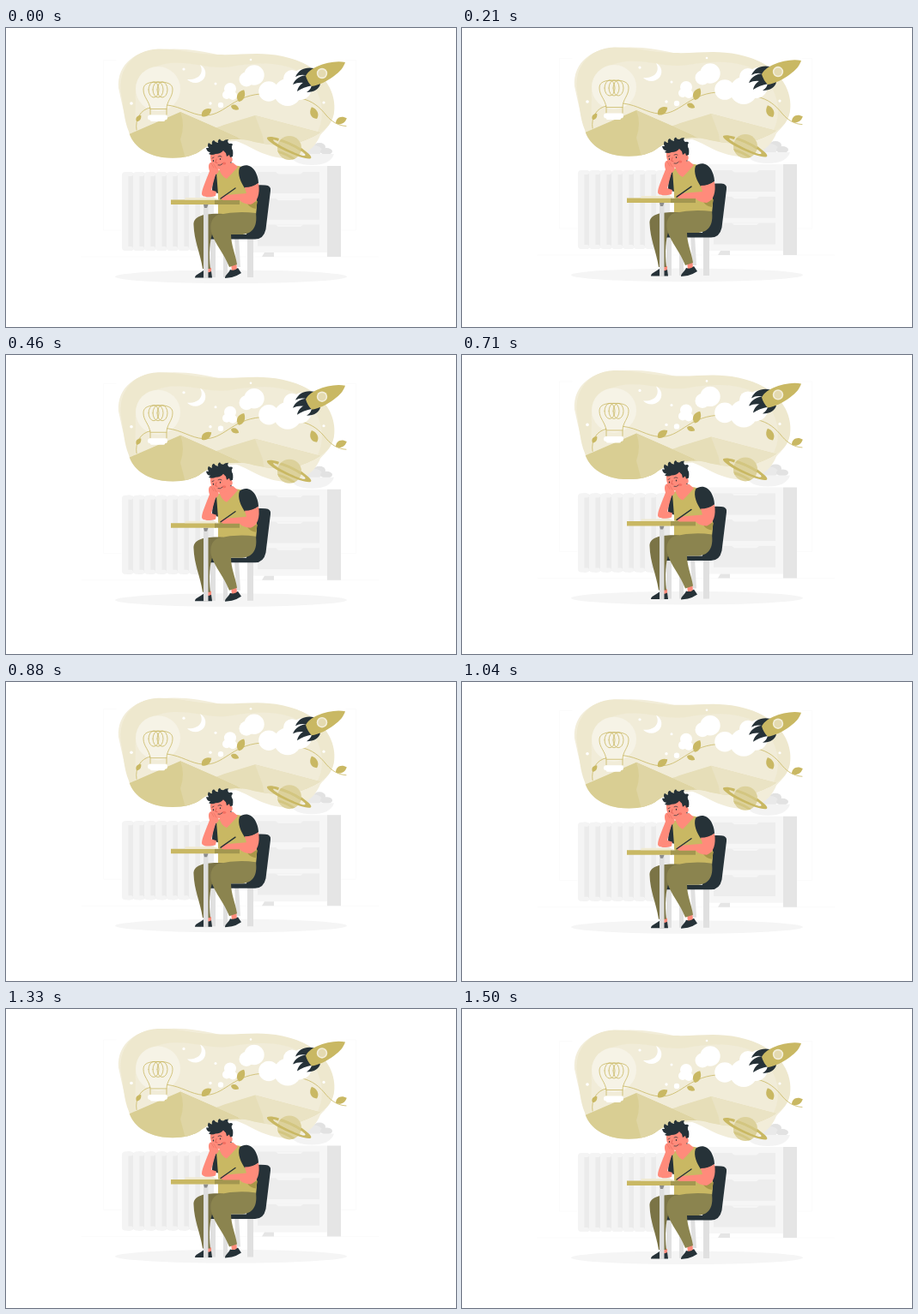
These frames come from a looping animation (524x349 px, 1.54 s). An HTML page with a canvas:

```html
<!DOCTYPE html>
<html lang="en">
<head>
<meta charset="utf-8">
<title>Daydreaming at the desk</title>
<style>
html, body { margin: 0; width: 100%; height: 100%; overflow: hidden; background: #fff; }
canvas { display: block; width: 524px; height: 349px; }
</style>
</head>
<body>
<canvas id="stage"></canvas>
<script>
const W = 524, H = 349;
const LOOP = 1540, STEPS = 36, STEP = 1500 / STEPS, LIFT = 6.98;
const GOLD = '#c9b863', DARK = '#263238', SKIN = '#ff8b7b', PANTS = '#8b844f', WHITE = '#fff';

const canvas = document.getElementById('stage');
const ctx = canvas.getContext('2d');
const ratio = window.devicePixelRatio || 1;
canvas.width = W * ratio;
canvas.height = H * ratio;

function fill(color, d) {
  ctx.fillStyle = color;
  ctx.fill(new Path2D(d));
}

function line(color, width, d) {
  ctx.strokeStyle = color;
  ctx.lineWidth = width;
  ctx.stroke(new Path2D(d));
}

function oval(color, x, y, rx, ry = rx) {
  ctx.fillStyle = color;
  ctx.beginPath();
  ctx.ellipse(x, y, rx, ry, 0, 0, Math.PI * 2);
  ctx.fill();
}

function box(color, x, y, w, h, r = 0) {
  ctx.fillStyle = color;
  ctx.beginPath();
  ctx.roundRect(x, y, w, h, r);
  ctx.fill();
}

function leaf(x, y, length, angle) {
  ctx.save();
  ctx.translate(x, y);
  ctx.rotate(angle * Math.PI / 180);
  ctx.scale(length, length);
  fill(GOLD, 'M0 0C.2 -.42 .7 -.42 1 0C.7 .34 .2 .34 0 0Z');
  ctx.restore();
}

function room() {
  line('#fbfbfb', 1, 'M128 37.5H113.5V236H134M396 37.5H407.5V236H390M88 267H434');
  oval('#f5f5f5', 262, 290.3, 135, 7.8);

  for (let i = 0; i < 8; i++) {
    const x = 135 + i * 13;
    box('#ebebeb', x, 168, 16, 92, 7);
    box('#f4f4f4', x, 168, 7.5, 92, 4);
    box('#f4f4f4', x + 2, 168, 11, 5, 4);
    box('#f4f4f4', x + 2, 255, 11, 5, 4);
  }

  oval('#e2e2e2', 365, 139, 7, 5);
  oval('#e9e9e9', 358, 143, 10, 6);
  oval('#e2e2e2', 373, 144, 7, 4);
  fill('#f3f3f3', 'M330 147H382C379 156 370 160 356 160C342 160 333 156 330 147Z');

  box('#f6f6f6', 287, 161, 87, 101);
  box('#e5e5e5', 374, 161, 16, 106);
  for (let i = 0; i < 3; i++) {
    const y = 168 + i * 30.7;
    box('#ededed', 293, y, 72, 25);
    fill('#f6f6f6', `M314 ${y}H346L343 ${y + 2.5}H317Z`);
  }
  fill('#e5e5e5', 'M301 262H312V267H298Z');
}

function dreamSky() {
  fill('#f2edd9', 'M131 70C129 41 153 25 181 25C206 23 226 26 256 33C290 39 308 28 338 38C369 47 380 74 382 92C383 110 372 118 366 125C358 145 340 153 322 152C296 149 284 137 268 132C245 132 225 146 185 150C143 143 138 100 131 70Z');

  ctx.save();
  const cloud = new Path2D('M134 76C130 50 146 26 177 24.5C201 24 222 31 247 31C275 32 294 27 322 33C350 39 356 48 366 56C381 68 386 92 380 106C374 121 356 128 343 133C322 139 304 136 289 133C276 129 262 129 250 132C240 134 234 138 228 142C217 151 200 153 182 151C163 148 147 137 143 121C137 106 137 92 134 76Z');
  ctx.fillStyle = '#eee8ce';
  ctx.fill(cloud);
  ctx.clip(cloud);
  fill('#f1ecd8', 'M151 84C149 60 165 44 191 41C221 39 235 49 263 45C299 38 338 41 354 61C368 79 373 102 362 123L150 130Z');
  fill('#e6deb8', 'M228 119Q243 118 254 113L290 102L366 122L388 131V160H215Z');
  fill('#eae3c4', 'M290 102L366 122L388 131V160H310Q300 139 299 126Q295 115 290 102Z');
  fill('#d9ce93', 'M134 128L203 98L270 128L278 160H130Z');
  fill('#dfd5a4', 'M203 98L242 115L278 132V160H211Q207 145 203 130Q209 113 203 98Z');
  ctx.restore();
}

function bulb() {
  oval('#f6f3e6', 177, 71, 26);
  line(GOLD, .8, 'M168 101V95C167 85 160 81 160 72C160 66 164 64 172 63H182C190 64 194 66 194 72C194 81 187 85 187 95V101M168 94.5H187');
  for (const x of [172, 177, 182]) {
    line(GOLD, .8, `M${x - 6} 72a6 9 0 1 0 12 0a6 9 0 1 0 -12 0`);
  }
  box(WHITE, 165, 101.5, 23, 6, 3);
  box(WHITE, 168, 106, 17, 3, 1.5);
}

function skyDetails() {
  line(GOLD, .8, 'M152 119C150 106 157 95 168 93M188 90C205 92 215 101 230 102C254 103 262 80 296 77M343 82C357 85 365 92 373 102C380 110 387 114 396 114.5');
  leaf(152, 109, 9, -55);
  leaf(228, 103, 14, -37);
  leaf(271, 86, 15, -66);
  leaf(262, 91, 10, 23);
  leaf(362, 106, 15, -114);
  leaf(384, 111, 14, -24);

  fill(WHITE, 'M226 43C236 48 234 63 221 64C216 64 213 62 211 60C225 61 231 52 226 43Z');
  const dots = [[207, 48, 1.6], [244, 65, 1.5], [238, 88, 1.7], [285, 37, 1.3], [146, 88, 1.8], [370, 87, 1.6], [250, 90, 3.2]];
  const puffs = [[289, 55, 11.7], [280, 60, 8.5], [261, 71, 7], [257, 78, 5], [264, 79, 5], [306, 74, 11.8], [328, 75, 16], [342, 70, 14], [333, 59, 10], [344, 57, 9]];
  for (const [x, y, r] of [...dots, ...puffs]) oval(WHITE, x, y, r);
}

function rocket() {
  fill(DARK, 'M359 47C349 45 341 48 337 57Q344 53 351 56Z');
  fill(DARK, 'M351 55C343 55 337 59 334 66Q340 63 347 64L354 61Z');
  fill(DARK, 'M352 61C345 63 340 68 339 74Q346 69 357 67Z');
  fill(DARK, 'M366 65C365 71 359 75 350 75Q356 71 356 66Z');
  fill(GOLD, 'M395 40C386 38 373 40 362 45C355 48 351 52 349 56Q351 63 356 68C364 67 374 62 382 56C389 51 393 46 395 40Z');
  oval('#f3eedb', 368, 53, 6.2);
  oval('#e4dab0', 368, 53, 4.6);
}

function planet() {
  oval('#dcd19b', 330, 140, 14);
  ctx.save();
  ctx.beginPath();
  ctx.arc(330, 140, 14, 0, Math.PI * 2);
  ctx.clip();
  line('#d3c681', 3, 'M315 130Q330 133 346 144M315 144Q328 147 338 155');
  ctx.restore();
  fill(GOLD, 'M318 129C308 126 303 127 304 129C307 137 350 156 355 152C357 150 352 146 344 140L343 143C347 146 350 148 348 149C343 150 313 135 311 131C311 130 314 131 317 132Z');
}

function chair() {
  fill('#e0e0e0', 'M281 244H288V291H281ZM266 244H271L273 279H268ZM253 244H258V291H253ZM238 238H244V291H238Z');
  fill(DARK, 'M288 184Q293 183 302 183.5Q309 184 308 190L302.5 235Q300 246.5 290 246.5H238V241H280Z');
}

function legs() {
  fill(SKIN, 'M231 279L239 280V286H232ZM262 275L268 273L269 282L263 284Z');
  fill(DARK, 'M220 291.5C220 288 225 287 230 283Q234 287 239 284L240 291.5Z');
  fill(DARK, 'M255 292C255 288 259 287 261 282Q266 284 270 280L274 286Q268 290 263 291Z');
  fill('#7b7446', 'M253 217C232 216 218 219 218.5 230C219 248 226 262 229 281L238 281C236 264 237 248 241 238Z');
  fill(PANTS, 'M247 218Q269 213 291 216C293 232 287 241 273 241H262C262 253 267 263 269 276L260 279C254 263 243 252 239 238C237 228 240 221 247 218Z');
}

function torso() {
  fill(DARK, 'M247 167C242 172 240 181 240 191L247 193Z');
  fill(GOLD, 'M245 168C252 163 261 160 271 161L283 164C291 179 294 199 291 218C278 222 258 221 247 219V195Z');
  fill('#a89749', 'M281 205L293 202L291 211Q284 210 281 205Z');
  fill(SKIN, 'M248 163L264 157L270 162Q264 169 257 176Q250 173 248 163Z');
  fill(DARK, 'M272 163C278 158 286 160 290 167C293 172 294 178 294 181Q286 187 278 187C274 181 269 171 272 163Z');
}

function head() {
  fill(SKIN, 'M238 147C241 139 259 138 262 147C265 154 261 164 252 165C244 166 237 159 238 147Z');
  oval(SKIN, 261.5, 153.5, 2.2, 3);
  fill(DARK, 'M233 140L236 140Q234 137 236 134Q238 136 240 136Q239 132 242 131Q244 134 247 134Q246 131 249 129.5Q250 132 253 132Q255 130 259 130Q257 133 260 135Q263 134 264 136Q262 138 263 141Q265 143 264 150L261 151L260 148L257 150L256 146L253 143Q250 147 244 147Q240 149 236 147L238 145Q234 145 233 140Z');
  oval('#f36f62', 254, 158, 2.2, 1.5);
  oval(DARK, 241.5, 155, .7, 1);
  oval(DARK, 249.5, 153, .7, 1);
  line(DARK, .7, 'M247 150Q249 148.5 251 150M240 152L242 151M247 160Q250 161 252 158.5');
  line('#d9584e', .7, 'M245 153L243.8 157L246 157.5');
  oval(DARK, 262, 157, .7);
}

function arms() {
  fill(SKIN, 'M238 157C235 159 236 164 237 167C233 178 228 188 228 194C229 198 237 198 244 196L245 191L239 189L244 171C248 169 249 166 246 163C244 161 244 157 241 157Z');
  line('#e66d61', .6, 'M239 158L242 163M242 159L245 164');
  fill(SKIN, 'M278 186Q287 186 294 181C296 194 293 203 285 206Q276 205.5 272 201H253C248 199 250 196 256 195L280 193Z');
}

function desk() {
  box('#dedede', 230, 206, 5.5, 86);
  fill('#8d8d8d', 'M230 206H235.5L234 210H231Z');
  box(GOLD, 192, 200.5, 52, 5.5);
  box('#a39750', 243, 200.5, 29, 5.5);
  fill('#f0ead2', 'M209 198H242L249 200.5H208Z');
}

function scene() {
  room();
  dreamSky();
  bulb();
  skyDetails();
  rocket();
  planet();
  chair();
  torso();
  legs();
  head();
  desk();
  arms();
  line(DARK, 1.4, 'M250 199L267 187');
}

function draw(now) {
  // The small lead absorbs timer rounding at step boundaries.
  const step = Math.min(STEPS, Math.floor((now % LOOP + 4) / STEP));
  const lift = LIFT * (1 - Math.abs(2 * step / STEPS - 1));
  ctx.setTransform(ratio, 0, 0, ratio, 0, 0);
  ctx.fillStyle = WHITE;
  ctx.fillRect(0, 0, W, H);
  ctx.translate(0, -lift);
  scene();
  requestAnimationFrame(draw);
}

ctx.lineCap = 'round';
draw(performance.now());
</script>
</body>
</html>
```
